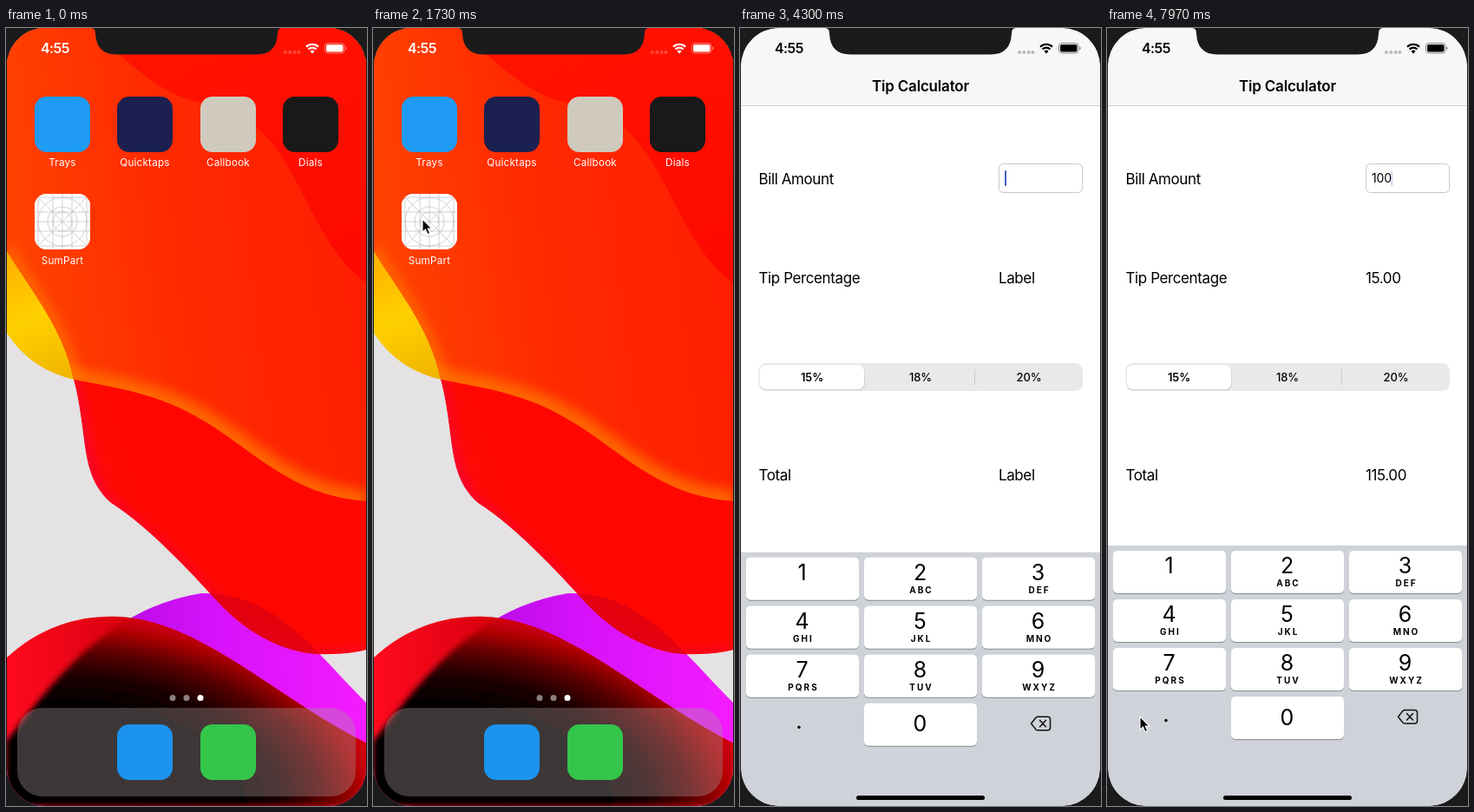
Write an HTML page that moves like this. It is 416 px wide and 896 px high and loops after 8 s.

```html
<!DOCTYPE html>
<html lang="en">
<head>
<meta charset="utf-8">
<title>Tip calculator demo</title>
<style>
html, body { margin: 0; width: 100%; height: 100%; overflow: hidden; background: #1b1b1b; }
svg { display: block; width: 100vw; height: 100vh; font-family: Inter, Roboto, sans-serif; }
.body { font-size: 17px; letter-spacing: -.4px; }
.title { font-size: 17px; letter-spacing: -.2px; }
.mid { text-anchor: middle; }
.semi { font-weight: 600; }
</style>
</head>
<body>
<svg id="stage" viewBox="0 0 416 896"></svg>
<script>
const LOOP = 8000;
const stage = document.getElementById('stage');

const statusBar = (ink, dots) => `
  <g fill="${ink}">
    <text x="40" y="29" class="semi" font-size="15.8" letter-spacing="-.5">4:55</text>
    <g fill="${dots}">${[322, 327.3, 332.6, 337.4].map(x => `<circle cx="${x}" cy="28" r="2"/>`).join('')}</g>
    <path d="M346 21.6a10 10 0 0 1 14 0M348.5 24.5a6.4 6.4 0 0 1 9 0" fill="none" stroke="${ink}" stroke-width="2.2"/>
    <path d="M350.5 26.8a3.5 3.5 0 0 1 5 0L353 29.4z"/>
    <rect x="367.5" y="17.5" width="22.5" height="11.5" rx="3.4" fill="none" stroke="${ink}" stroke-opacity=".45"/>
    <rect x="369" y="19" width="19.5" height="8.5" rx="2"/>
    <path d="M391.3 21.3q3 2 0 4z" opacity=".5"/>
  </g>`;

const tile = (x, y, fill) => `<rect x="${x}" y="${y}" width="64" height="64" rx="14" fill="${fill}"/>`;
const iconLabel = (x, y, name) =>
  `<text x="${x}" y="${y}" class="mid" font-size="11.7" letter-spacing=".2" fill="#fff">${name}</text>`;

const homeApps = [
  [33, 'Trays', '#1f9bf3'], [128, 'Quicktaps', '#1c2050'],
  [224, 'Callbook', '#cfcabd'], [319, 'Dials', '#191919']
].map(([x, name, fill]) => tile(x, 79, fill) + iconLabel(x + 32, 159, name)).join('');

// Blank icon template, drawn on a 64 unit square
const blankIcon = `
  <rect width="64" height="64" fill="#fff"/>
  <g fill="none" stroke="#bdbdbd" stroke-width=".7">
    ${[11, 17, 28].map(r => `<circle cx="32" cy="32" r="${r}"/>`).join('')}
    ${[4, 21, 32, 43, 60].map(p => `<path d="M${p} 0V64M0 ${p}H64"/>`).join('')}
    <path d="M0 0L64 64M64 0L0 64"/>
  </g>`;

// Wallpaper outlines: an open edge each, closed along the stage border
const RED_EDGE = 'M0 255C22 293 67 345 78 405C95 470 84 515 121 547C165 575 210 624 246 663C287 706 335 724 375 721Q398 721 416 716';
const ORANGE_EDGE = 'M0 350C20 381 48 399 84 406C142 417 184 424 237 458C290 492 335 540 416 545';
const MAGENTA_EDGE = 'M0 822C60 745 120 668 225 651C310 650 350 712 416 778';
const FRONT_EDGE = 'M0 726C40 689 85 676 130 678C225 683 310 771 416 824';
const closeTop = edge => edge + 'V0H0Z';
const closeBottom = edge => edge + 'V896H0Z';

const edgeGlow = (edge, color, width, opacity) =>
  `<path d="${edge}" fill="none" stroke="${color}" stroke-width="${width}" opacity="${opacity}" filter="url(#soft)"/>`;

const wallpaper = `
  <rect width="416" height="896" fill="#e4e2e3"/>
  <path d="${closeBottom(MAGENTA_EDGE)}" fill="url(#magenta)"/>
  <path d="${closeTop(ORANGE_EDGE)}" fill="url(#yellow)"/>
  <g clip-path="url(#redClip)">
    <path d="${closeTop(RED_EDGE)}" fill="url(#red)"/>
    ${edgeGlow(RED_EDGE, '#ee0058', 8, .6)}
    <path d="${closeBottom(MAGENTA_EDGE)}" fill="#dc0012" opacity=".75"/>
    <g clip-path="url(#orangeClip)">
      <path d="${closeTop(ORANGE_EDGE)}" fill="url(#orange)"/>
      ${edgeGlow(ORANGE_EDGE, '#ff7a00', 26, .75)}
      ${edgeGlow('M0 255C22 293 67 345 78 405', '#ff8a00', 16, .5)}
    </g>
    <path d="M125 0V25C165 62 195 82 230 87C338 103 338 240 416 294V0Z" fill="url(#crimson)"/>
  </g>
  <path d="${closeBottom(FRONT_EDGE)}" fill="url(#scarlet)"/>
  <g clip-path="url(#frontClip)">
    <path d="${closeBottom(MAGENTA_EDGE)}" fill="url(#dark)" filter="url(#softer)"/>
  </g>`;

const row = (y, text) => `<text x="21.5" y="${y}" class="body">${text}</text>`;
const value = (id, y) => `<text id="${id}" x="298" y="${y}" class="body">Label</text>`;

const letters = ['', 'ABC', 'DEF', 'GHI', 'JKL', 'MNO', 'PQRS', 'TUV', 'WXYZ'];
const key = (digit, col, rowIndex, sub) => {
  const x = 7 + col * 136, y = 602 + rowIndex * 56;
  return `
    <rect x="${x}" y="${y + 1}" width="130" height="49" rx="5" fill="#898b8f"/>
    <rect id="key${digit}" x="${x}" y="${y}" width="130" height="49" rx="5" fill="#fff"/>
    <text x="${x + 64.5}" y="${y + (digit ? 26 : 32.5)}" class="mid" font-size="25">${digit}</text>
    <text x="${x + 66}" y="${y + 41}" class="mid" font-size="10" font-weight="700" letter-spacing="2">${sub}</text>`;
};
const keyboard = `
  <rect y="596" width="416" height="310" fill="#cfd2d8"/>
  ${letters.map((sub, i) => key(i + 1, i % 3, Math.floor(i / 3), sub)).join('')}
  ${key(0, 1, 3, '')}
  <circle cx="68" cy="797.5" r="1.7"/>
  <path d="M343 785.5h11.5q3 0 3 3v9.5q0 3-3 3H343q-1.2 0-2-.9l-5.5-6.8 5.5-6.9q.8-.9 2-.9zM345.5 789.5l7 7.5m0-7.5l-7 7.5"
    fill="none" stroke="#111" stroke-width="1.5" stroke-linejoin="round" stroke-linecap="round"/>`;

const appScreen = `
  <rect width="416" height="89" fill="#f7f7f7"/>
  <rect y="89" width="416" height="1" fill="#d2d2d3"/>
  ${statusBar('#000', '#b9b9b9')}
  <text x="208" y="73" class="title semi mid">Tip Calculator</text>
  ${row(179.5, 'Bill Amount')}${row(293.5, 'Tip Percentage')}${row(520.5, 'Total')}
  ${value('tip', 293.5)}${value('total', 520.5)}
  <rect x="298.5" y="156.5" width="96" height="33" rx="5" fill="#fff" stroke="#c9c9cb"/>
  <text id="bill" x="305" y="178" font-size="14" letter-spacing="-.2"></text>
  <rect id="caret" y="164" width="2" height="18" rx="1" fill="#4560c4"/>
  <rect x="21.5" y="386" width="373.5" height="32" rx="8.5" fill="#e9e9eb"/>
  <rect x="23" y="389" width="121" height="28.5" rx="7" fill="#d5d5d7"/>
  <rect x="23" y="388" width="120" height="28" rx="7" fill="#fff"/>
  <rect x="270" y="393" width="1" height="18" fill="#cbcbcf"/>
  <g class="mid" font-size="13" font-weight="500" letter-spacing="-.1">
    <text x="83" y="406.7" class="semi">15%</text>
    <text x="208" y="406.7">18%</text>
    <text x="333" y="406.7">20%</text>
  </g>
  <g id="keyboard">${keyboard}</g>
  <rect id="homeBar" x="134" y="884" width="148" height="5" rx="2.5"/>`;

const stopTags = stops => stops.map(([at, color]) => `<stop offset="${at}" stop-color="${color}"/>`).join('');
const radial = (id, cx, cy, radii, stops) => `
  <radialGradient id="${id}" gradientUnits="userSpaceOnUse" cx="0" cy="0" r="1"
    gradientTransform="translate(${cx} ${cy}) scale(${radii})">${stopTags(stops)}</radialGradient>`;
const linear = (id, x1, y1, x2, y2, stops) => `
  <linearGradient id="${id}" gradientUnits="userSpaceOnUse" x1="${x1}" y1="${y1}" x2="${x2}" y2="${y2}">${stopTags(stops)}</linearGradient>`;
const clip = (id, path) => `<clipPath id="${id}"><path d="${path}"/></clipPath>`;
const blur = (id, size) => `
  <filter id="${id}" filterUnits="userSpaceOnUse" x="-60" y="-60" width="536" height="1016"><feGaussianBlur stdDeviation="${size}"/></filter>`;

stage.innerHTML = `
  <defs>
    ${linear('magenta', 140, 0, 416, 0, [[0, '#bc0cea'], [.4, '#d812fb'], [1, '#f41cff']])}
    ${linear('yellow', 0, 260, 60, 410, [[0, '#ffb000'], [.5, '#ffd000'], [1, '#f0b400']])}
    ${linear('red', 80, 520, 140, 500, [[0, '#f4002c'], [.5, '#fe0a08'], [1, '#ff0700']])}
    ${linear('orange', 0, 250, 416, 200, [[0, '#ff4300'], [.45, '#ff2a00'], [1, '#ff1e00']])}
    ${linear('crimson', 200, 40, 330, 300, [[0, '#ff1200'], [1, '#fd0900']])}
    ${linear('scarlet', 0, 0, 416, 0, [[0, '#ff0a1e'], [.35, '#d8000e'], [1, '#f80010']])}
    ${radial('dark', 70, 900, '390 240', [[.5, '#000'], [.64, '#1c0000'], [.76, '#5a0000'], [.88, '#b80006'], [1, '#f00014']])}
    ${blur('soft', 7)}${blur('softer', 3)}
    ${clip('redClip', closeTop(RED_EDGE))}
    ${clip('orangeClip', closeTop(ORANGE_EDGE))}
    ${clip('frontClip', closeBottom(FRONT_EDGE))}
    <clipPath id="screenClip"><rect x="1" width="414" height="896" rx="44"/></clipPath>
    <clipPath id="windowClip"><rect id="windowShape"/></clipPath>
  </defs>
  <rect width="416" height="896" fill="#1b1b1b"/>
  <g clip-path="url(#screenClip)">
    <g id="home">
      <g id="wallpaper">${wallpaper}</g>
      <rect id="dim" width="416" height="896"/>
      <g id="icons">
        ${statusBar('#fff', '#ff4a3a')}
        ${homeApps}
        ${iconLabel(65, 271.5, 'SumPart')}
        ${[192, 208, 224].map((x, i) => `<circle cx="${x}" cy="771.5" r="3.5" fill="#fff" opacity="${i < 2 ? .5 : 1}"/>`).join('')}
        <rect x="13" y="783" width="390" height="102" rx="29" fill="#a99a9a" opacity=".36"/>
        ${tile(128, 802, '#1c93ee')}${tile(224, 802, '#34c64a')}
      </g>
    </g>
    <g clip-path="url(#windowClip)">
      <rect width="416" height="896" fill="#fff"/>
      <g id="app">${appScreen}</g>
      <g id="blank">${blankIcon}</g>
    </g>
    <path d="M98 0Q103 0 103 6Q104 30.5 127 30.5H289Q312 30.5 313 6Q313 0 318 0Z" fill="#1b1b1b"/>
  </g>
  <path id="pointer" d="M0 0V15.2L3.5 12 5.9 17.6 8.6 16.4 6.2 11H10.8Z" stroke="#fff" stroke-width="1.1"/>`;

const el = {};
stage.querySelectorAll('[id]').forEach(node => el[node.id] = node);
const set = (node, attrs) => { for (const name in attrs) node.setAttribute(name, attrs[name]); };
const clamp = v => Math.min(1, Math.max(0, v));
const ramp = (t, from, to) => clamp((t - from) / (to - from));
const mix = (a, b, p) => a + (b - a) * p;
const smooth = p => p * p * (3 - 2 * p);
// Critically damped spring from 0 to 1
const spring = (ms, speed) => {
  const x = Math.max(0, ms) / 1000 * speed;
  return 1 - (1 + x) * Math.exp(-x);
};

// Pointer runs as [time, x, y]; hidden between runs
const pointerRuns = [
  [[700, 418, 40], [1070, 89, 186], [1500, 57, 220], [2970, 57, 220], [3570, 345, 166], [3900, 345, 166]],
  [[5070, 356, 170], [5430, 151, 500], [5830, 69, 784], [6030, 69, 784], [6230, 70, 625],
   [6870, 70, 625], [7120, 205, 788], [7770, 205, 788], [7970, 38, 793], [8000, 38, 793]]
];

const taps = [
  { digit: 1, down: 6330, up: 6430 },
  { digit: 0, down: 7150, up: 7230 },
  { digit: 0, down: 7320, up: 7410 }
];

function drawPointer(t) {
  const run = pointerRuns.find(r => t >= r[0][0] && t < r[r.length - 1][0]);
  el.pointer.style.display = run ? '' : 'none';
  if (!run) return;
  const i = run.findIndex(p => p[0] > t), [t0, x0, y0] = run[i - 1], [t1, x1, y1] = run[i];
  const p = smooth(ramp(t, t0, t1));
  set(el.pointer, { transform: `translate(${mix(x0, x1, p)} ${mix(y0, y1, p)})` });
}

function drawLaunch(t) {
  const ms = t - 1950, done = t >= 2600;
  const grow = speed => done ? 1 : spring(ms, speed);
  const p = grow(12.14);
  const left = mix(33, 1, p), width = mix(97, 415, p) - left;
  const top = mix(191, 0, grow(10)), bottom = mix(255, 896, grow(11.4));
  set(el.windowShape, { x: left, y: top, width, height: bottom - top, rx: mix(14, 44, p) });

  const scale = width / 414;
  set(el.app, { transform: `translate(${left - scale} ${top}) scale(${scale})`, opacity: ramp(t, 2200, 2445) });
  set(el.blank, { transform: `translate(${left} ${top}) scale(${width / 64})`, opacity: 1 - ramp(p, .05, .4) });

  el.home.style.display = done ? 'none' : '';
  const zoom = 1 + .15 * p;
  set(el.wallpaper, { transform: `translate(208 448) scale(${zoom}) translate(-208 -448)` });
  el.wallpaper.style.filter = p > 0 ? `blur(${8 * p}px)` : 'none';
  set(el.dim, { opacity: .56 * p });
  set(el.icons, {
    opacity: 1 - ramp(p, 0, .6),
    transform: `translate(65 223) scale(${1 + p}) translate(-65 -223)`
  });
  set(el.homeBar, { opacity: ramp(t, 2450, 2600) });
}

function caretOpacity(t) {
  if (t < 3930) return 0;
  if (t < 5070) return 1 - ramp(t, 4500, 4730);
  if (t < 6030) return ramp(t, 5070, 5250) * (1 - ramp(t, 5600, 5830));
  if (t < 6430) return ramp(t, 6030, 6200);
  if (t < 7230) return 1 - ramp(t, 6750, 6850) + ramp(t, 6990, 7150);
  return 1 - ramp(t, 7770, 8040);
}

function drawForm(t) {
  set(el.keyboard, { transform: `translate(0 ${300 * (1 - spring(t - 3930, 14.9))})` });
  for (const digit of [0, 1]) {
    const pressed = taps.some(tap => tap.digit === digit && t >= tap.down && t < tap.up);
    set(el['key' + digit], { fill: pressed ? '#b4b8c1' : '#fff' });
  }
  const bill = taps.filter(tap => t >= tap.up).map(tap => tap.digit).join('');
  el.bill.textContent = bill;
  el.tip.textContent = bill ? (bill * .15).toFixed(2) : 'Label';
  el.total.textContent = bill ? (bill * 1.15).toFixed(2) : 'Label';
  set(el.caret, { x: 305 + (bill ? el.bill.getComputedTextLength() - .5 : 0), opacity: caretOpacity(t) });
}

function draw(t) {
  drawLaunch(t);
  drawForm(t);
  drawPointer(t);
}

const start = performance.now();
function tick() {
  draw((performance.now() - start) % LOOP);
  requestAnimationFrame(tick);
}
tick();
</script>
</body>
</html>
```
